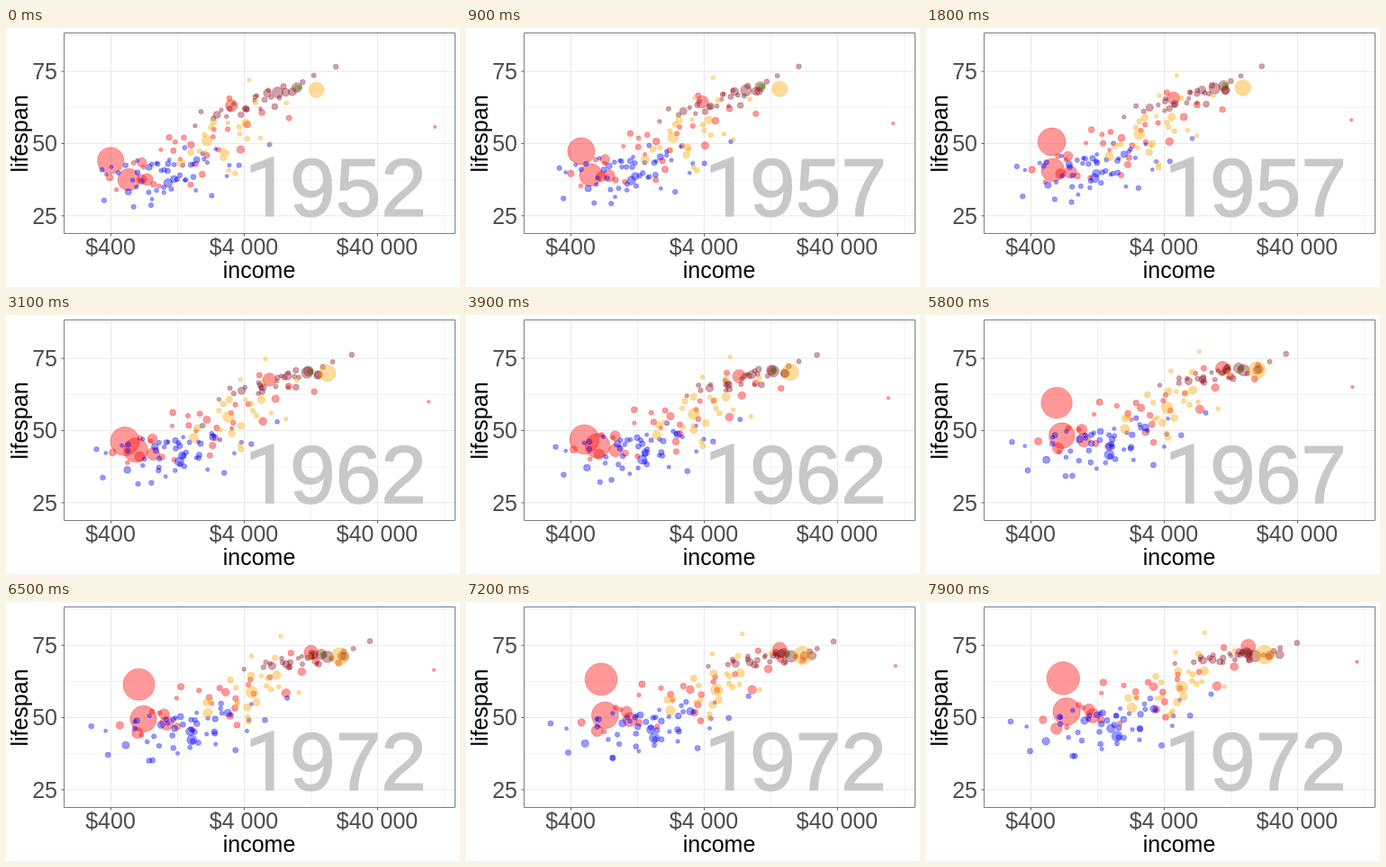
These frames come from a looping animation (504x288 px, 8000 ms). An HTML page with a canvas:

```html
<!DOCTYPE html>
<html lang="en">
<head>
<meta charset="utf-8">
<title>Income and lifespan</title>
<style>
html, body { margin: 0; width: 100%; height: 100%; overflow: hidden; background: #fff; }
canvas { display: block; }
</style>
</head>
<body>
<canvas id="stage" width="504" height="288"></canvas>
<script>
const ctx = document.getElementById('stage').getContext('2d');
const SANS = '"Liberation Sans", Arial, sans-serif';
const LOOP = 8000, FRAME = 100, FRAMES_PER_STEP = 18, STEPS = 5;
const panel = { x: 64.5, y: 5.5, w: 434, h: 223 };
const xOf = income => 116.2 + 148 * Math.log10(income / 400);
const yOf = life => 128.1 - (life - 50) * 3.22;
const mix = (a, b, f) => a + (b - a) * f;

// Seeded random numbers, uniform and roughly normal
let seed = 1952;
function random() {
  seed = (seed * 1664525 + 1013904223) % 4294967296;
  return seed / 4294967296;
}
const normal = () => 2 * (random() + random() + random() - 1.5);

// from, to: the cloud in 1952 and 1972 as
// [log income, its spread, life, life per unit of spread, noise of life].
// giants: population in millions, years between points, [income, life] points.
const continents = [
  { color: '#00ff00', growth: 1.02, count: 0, giants: [
    [8.7, 20, [10040, 69.1], [16789, 71.9]],
    [2, 20, [10557, 69.4], [16046, 71.9]]
  ] },
  { color: '#ff0000', growth: 1.022, count: 26, pop: 5,
    from: [3.2, 0.33, 47.5, 6, 5], to: [3.48, 0.42, 58, 6, 4], giants: [
    [556, 5, [400, 44], [576, 50.5], [488, 44.5], [613, 58.4], [677, 63.1], [741, 64]],
    [372, 20, [547, 37.4], [724, 50.7]],
    [86, 20, [3217, 63], [14779, 73.4]],
    [82, 10, [750, 37.5], [849, 42.5], [1111, 49.2]],
    [47, 20, [684, 37.5], [630, 45.3]],
    [41, 20, [685, 43.4], [1050, 51.9]],
    [0.2, 10, [108382, 55.6], [95458, 60.5], [109348, 67.7]]
  ] },
  { color: '#0000ff', growth: 1.025, count: 51, pop: 2.7,
    from: [3.03, 0.27, 39.5, 2.2, 4.5], to: [3.18, 0.3, 47, 2.4, 4.5], giants: [
    [33, 20, [1077, 36.3], [1698, 42.8]]
  ] },
  { color: '#8b1423', growth: 1.007, count: 28, pop: 6.5,
    from: [3.69, 0.25, 65, 4, 2], to: [4.08, 0.21, 70.9, 1.4, 1.1], giants: [
    [69, 10, [7144, 67.5], [12902, 70.3], [18016, 71]],
    [50, 20, [9980, 69.2], [15895, 72]]
  ] },
  { color: '#ffa500', growth: 1.018, count: 23, pop: 3.5,
    from: [3.5, 0.19, 53, 3.5, 7], to: [3.7, 0.2, 61.5, 3.5, 6], giants: [
    [57, 20, [2109, 50.9], [4986, 59.5]],
    [158, 20, [13990, 68.4], [21806, 71.3]]
  ] }
];

// One small country: it keeps its rank in the cloud and wavers a little.
function makeSmall({ count, pop, from, to }, i) {
  const p = (i + 0.5) / count;
  const rank = Math.max(-1.9, Math.log(p / (1 - p)) / 1.7);
  const luck = normal(), drift = normal() * 0.06;
  const points = [];
  for (let k = 0; k <= STEPS; k++) {
    const f = k / 4;
    const [income, spread, life, slope, noise] = from.map((v, j) => mix(v, to[j], f));
    points.push([
      10 ** (income + spread * rank + drift * f + normal() * 0.015),
      life + slope * rank + noise * luck + normal() * 0.3
    ]);
  }
  return [pop * Math.exp(0.9 * normal()), 5, ...points];
}

const bubbles = continents.flatMap(land => {
  const small = Array.from({ length: land.count }, (_, i) => makeSmall(land, i));
  return [...land.giants, ...small].map(([pop, gap, ...points]) => ({
    color: land.color, growth: land.growth, pop, gap,
    knots: points.map(([income, life]) => [xOf(income), yOf(life)])
  }));
});

function line(x1, y1, x2, y2, color, width) {
  ctx.strokeStyle = color;
  ctx.lineWidth = width;
  ctx.beginPath();
  ctx.moveTo(x1, y1);
  ctx.lineTo(x2, y2);
  ctx.stroke();
}

function text(str, x, y, color, align = 'center') {
  ctx.font = `25px ${SANS}`;
  ctx.textAlign = align;
  ctx.fillStyle = color;
  ctx.fillText(str, x, y);
}

function drawAxes() {
  const { x, y, w, h } = panel, right = x + w, bottom = y + h;
  const grid = '#e9e9e9', dark = '#333', label = '#4d4d4d';
  for (let i = 0; i < 3; i++) {
    const gx = 116.5 + 148 * i, gy = 48.2 + 80.3 * i;
    line(gx + 74, y, gx + 74, bottom, grid, 0.6);
    line(x, gy - 40, right, gy - 40, grid, 0.6);
    line(gx, y, gx, bottom, grid, 1.1);
    line(x, gy, right, gy, grid, 1.1);
    line(gx, bottom, gx, bottom + 3, dark, 0.8);
    line(x - 3, gy, x, gy, dark, 0.8);
    text(['$400', '$4 000', '$40 000'][i], gx - 0.5, 252, label);
    text(75 - 25 * i, 57, gy + 8.8, label, 'right');
  }
  text('income', 281, 278, '#000');
  ctx.save();
  ctx.translate(23.5, 117.5);
  ctx.rotate(-Math.PI / 2);
  text('lifespan', 0, 0, '#000');
  ctx.restore();
}

// The leading 1 has no foot, so it comes from another face.
function drawYear(year) {
  const size = 91, left = 264.5, base = 209;
  ctx.fillStyle = ctx.strokeStyle = '#c8c8c8';
  ctx.lineWidth = 1.4;
  ctx.lineJoin = 'round';
  ctx.textAlign = 'left';
  const part = (str, x, face) => {
    ctx.font = `${size}px ${face}`;
    ctx.fillText(str, x, base);
    ctx.strokeText(str, x, base);
  };
  part('1', left, `Roboto, ${SANS}`);
  part(String(year).slice(1), left + size * 0.556, SANS);
}

function drawBubble({ color, growth, pop, gap, knots }, years) {
  const i = Math.min(Math.floor(years / gap), knots.length - 2);
  const f = years / gap - i;  // past the last knot the trend goes on
  const [a, b] = [knots[i], knots[i + 1]];
  const r = 1.5 + 0.56 * Math.sqrt(pop * growth ** years);
  ctx.fillStyle = ctx.strokeStyle = color;
  ctx.beginPath();
  ctx.arc(mix(a[0], b[0], f), mix(a[1], b[1], f), r, 0, 2 * Math.PI);
  ctx.fill();
  ctx.stroke();
}

function draw(now) {
  const step = Math.floor((now % LOOP) / FRAME) / FRAMES_PER_STEP;
  ctx.fillStyle = '#fff';
  ctx.fillRect(0, 0, 504, 288);
  drawAxes();
  drawYear(1952 + 5 * Math.round(step));
  ctx.globalAlpha = 0.4;
  ctx.lineWidth = 0.7;
  for (const b of bubbles) drawBubble(b, step * 5);
  ctx.globalAlpha = 1;
  ctx.strokeStyle = '#7a7f7a';
  ctx.lineWidth = 1;
  ctx.strokeRect(panel.x, panel.y, panel.w, panel.h);
}

const start = performance.now();
function tick() {
  draw(performance.now() - start);
  requestAnimationFrame(tick);
}
tick();
</script>
</body>
</html>
```
